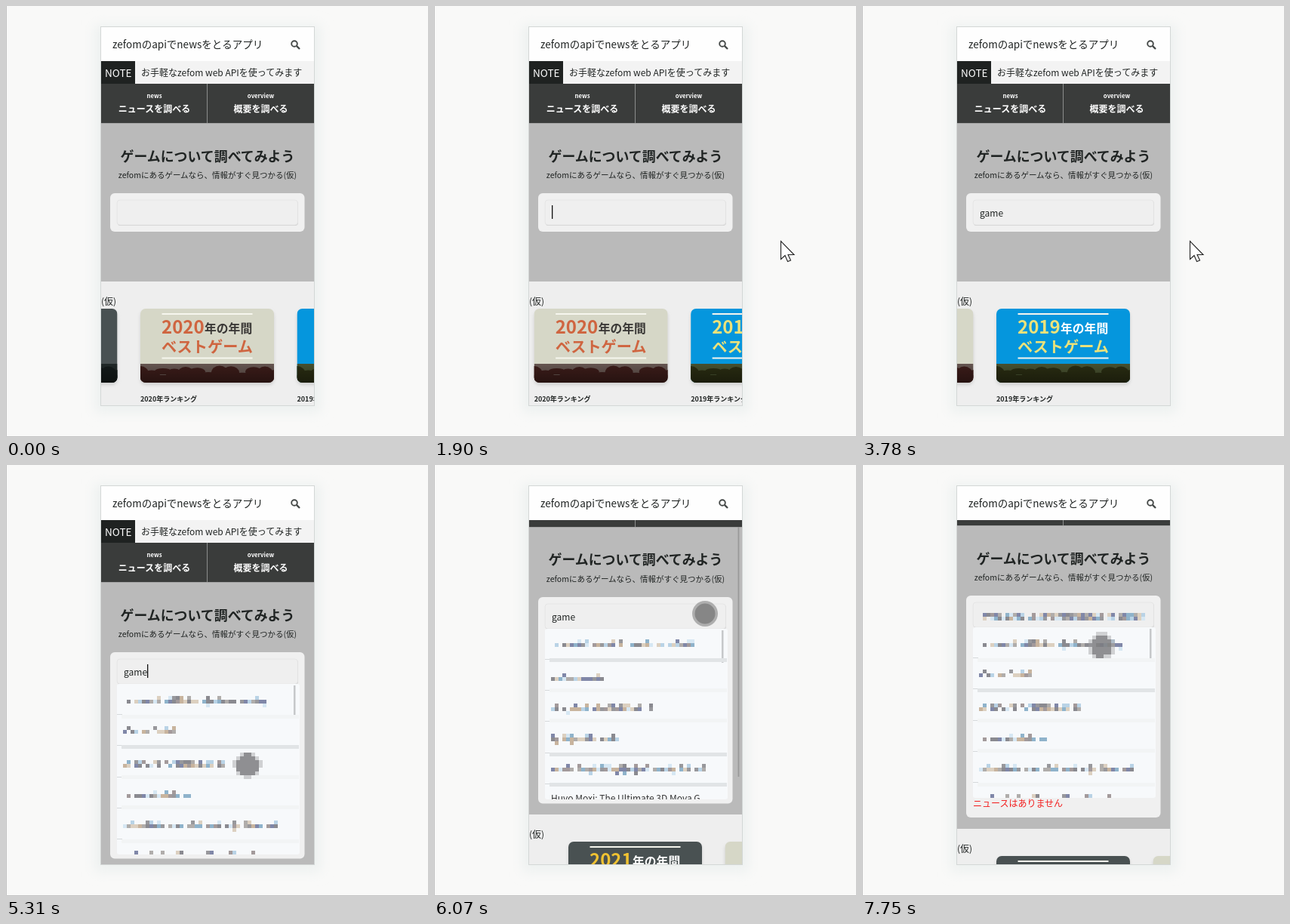
Animation, 559 px wide and 571 px high, one loop 8000 ms. Source, as an HTML page with a canvas:

```html
<!DOCTYPE html>
<html lang="ja">
<head>
<meta charset="utf-8">
<title>App demo</title>
<style>
  html, body { margin: 0; width: 100%; height: 100%; overflow: hidden; background: #f9f9f8; }
  svg, canvas { position: absolute; left: 0; top: 0; display: block; }
  text { font-family: "Noto Sans CJK JP", "Noto Sans CJK", "Noto Sans", sans-serif; fill: #202423; }
  .mid { text-anchor: middle; }
  .white { fill: #fff; }
  .bold { font-weight: 700; }
  .medium { font-weight: 500; }
</style>
</head>
<body>
<svg width="559" height="571" viewBox="0 0 559 571">
  <defs>
    <clipPath id="view"><rect x="126" y="28" width="282" height="501"/></clipPath>
    <clipPath id="round"><rect width="177" height="98" rx="7"/></clipPath>
    <filter id="soft" x="-20%" y="-20%" width="140%" height="140%"><feGaussianBlur stdDeviation="8"/></filter>
    <filter id="low" x="-10%" y="-10%" width="120%" height="130%"><feGaussianBlur stdDeviation="2"/></filter>
    <linearGradient id="shade" x2="0" y2="1">
      <stop offset="0" stop-color="#000" stop-opacity="0"/>
      <stop offset="1" stop-color="#000" stop-opacity=".35"/>
    </linearGradient>
  </defs>
  <path d="M.5 0V570.5H559" fill="none" stroke="#c2c2c2"/>
  <rect x="117" y="25" width="300" height="514" fill="#edf1f0" filter="url(#soft)"/>
  <rect x="125.5" y="27.5" width="283" height="502" fill="#eee" stroke="#d3d7d6"/>

  <g clip-path="url(#view)">
    <g id="page">
      <rect x="126" y="73" width="282" height="30" fill="#f3f3f3"/>
      <rect x="126" y="73" width="45" height="30" fill="#1f2221"/>
      <text class="white medium" x="131" y="94" font-size="13.5">NOTE</text>
      <text x="179" y="93" font-size="12">お手軽なzefom web APIを使ってみます</text>
      <rect x="126" y="103" width="282" height="52.5" fill="#3a3c3b"/>
      <path d="M266.5 103V155" stroke="#8b8d8c"/>
      <g class="mid bold">
        <text class="white" x="196.5" y="122" font-size="7.8">news</text>
        <text class="white" x="337.5" y="122" font-size="7.8">overview</text>
        <text class="white" x="196.5" y="141" font-size="12">ニュースを調べる</text>
        <text class="white" x="337.5" y="141" font-size="12">概要を調べる</text>
      </g>
      <rect id="hero" x="126" y="155.5" width="282" height="209.5" fill="#bababa"/>
      <text class="mid bold" x="267" y="205.500" font-size="17.900">ゲームについて調べてみよう</text>
      <text class="mid" x="267" y="228" font-size="10.5">zefomにあるゲームなら、情報がすぐ見つかる(仮)</text>
      <rect id="panel" x="138" y="248" width="257.500" rx="6" fill="#f0f0f0"/>
      <rect x="147.500" y="258" width="239.500" height="33" rx="4" fill="#d2d2d2"/>
      <rect x="147" y="257" width="239.500" height="33" rx="4" fill="#efefef" stroke="#e3e3e3" stroke-width=".8"/>
      <text id="typed" x="156" y="279" font-size="12"></text>
      <rect id="caret" x="156" y="264" width="1.3" height="18" fill="#111"/>
      <g id="list">
        <rect x="147" y="290" width="242" height="226" rx="3" fill="#f7f9fb"/>
        <rect x="381" y="292" width="2.500" height="43" fill="#c6c8ca"/>
      </g>
      <text id="error" x="147" y="528" font-size="12" style="fill:#f32020">ニュースはありません</text>
      <g id="below">
        <text x="126" y="396" font-size="12">(仮)</text>
        <g id="slider"></g>
      </g>
    </g>
    <rect x="126" y="28" width="282" height="45" fill="#fefefe"/>
    <text class="medium" x="141" y="56" font-size="13.5">zefomのapiでnewsをとるアプリ</text>
    <g fill="none" stroke="#434746" stroke-width="1.900">
      <circle cx="382" cy="50" r="3.800"/>
      <path d="M384.900 52.900L389 57" stroke-width="2.300"/>
    </g>
    <rect id="bar" x="402.500" width="1.800" height="331" fill="#999"/>
  </g>
</svg>
<canvas id="top" width="559" height="571"></canvas>

<script>
const DURATION = 8000, PITCH = 207.5, CELL = 5;
const $ = id => document.getElementById(id);
const ctx = $('top').getContext('2d');

function card(i, year, bg, main, sub, photo, trees) {
  const bumps = Array.from({ length: 13 }, (_, k) =>
    `<ellipse cx="${k * 15}" cy="${86 + 3 * Math.sin(k * 2.3)}" rx="11" ry="${7 + 3 * Math.cos(k * 1.7)}"/>`).join('');
  return `<g transform="translate(${178 + i * PITCH} 401)">
    <rect y="3" width="177" height="98" rx="7" fill="#cfcfcf" filter="url(#low)"/>
    <g clip-path="url(#round)">
      <rect width="177" height="98" fill="${bg}"/>
      <rect y="73" width="177" height="25" fill="${trees}"/>
      <g fill="${photo}">${bumps}<rect y="88" width="177" height="10"/></g>
      <rect y="73" width="177" height="25" fill="url(#shade)"/>
    </g>
    <path d="M28.500 7H148.500M28.500 65.500H148.500" stroke="#f6f6ee" stroke-width="2"/>
    <g class="bold">
      <text x="28" y="33" font-size="24" style="fill:${main}">${year}</text>
      <text x="85" y="32" font-size="15.800" style="fill:${sub}">年の年間</text>
      <text x="28" y="58" font-size="20.200" style="fill:${main}">ベストゲーム</text>
      <text x="0" y="123" font-size="9">${year}年ランキング</text>
    </g></g>`;
}
$('slider').innerHTML =
  card(-1, 2021, '#495152', '#f0c232', '#fff', '#131a19', '#202827') +
  card(0, 2020, '#d6d7c7', '#cf6540', '#3a3836', '#3b1c19', '#655550') +
  card(1, 2019, '#0596dd', '#ece27a', '#fff', '#292c12', '#46502f');

const pointerKeys = [
  [330, 529, 575], [1010, 309, 261], [1080, 306, 265], [1220, 301, 272], [1490, 301, 272],
  [1900, 459, 311], [2240, 434, 311], [5030, 434, 311], [5031, 303, 403], [5100, 320, 397],
  [5360, 320, 397], [5560, 359, 272], [6070, 359, 197], [6340, 359, 197], [6400, 367, 212],
  [6550, 367, 212], [7030, 317, 240]];
const scrollKeys = [[5560, 0], [6070, 73], [6140, 75]];
const slideKeys = [[1756, 0], [2236, -1], [4834, -1], [5134, 1]];
const caretOn = [[1490, 2570], [2790, 3780], [4320, 5400], [6350, 6900]];
const typing = [2790, 2920, 3050, 3310];

// Eased value between [time, ...values] keys
function at(keys, t) {
  const n = keys.findIndex(k => k[0] > t);
  if (n === 0) return keys[0].slice(1);
  if (n < 0) return keys[keys.length - 1].slice(1);
  const [a, b] = [keys[n - 1], keys[n]];
  const p = (t - a[0]) / (b[0] - a[0]), e = p * p * (3 - 2 * p);
  return a.slice(1).map((v, i) => v + (b[i + 1] - v) * e);
}
const show = (id, on) => $(id).setAttribute('visibility', on ? 'visible' : 'hidden');
const move = (id, x, y) => $(id).setAttribute('transform', `translate(${x} ${y})`);
function hash(a, b, c) {
  const v = Math.sin(a * 12.9898 + b * 78.233 + c * 37.719 + 4.1) * 43758.5453;
  return v - Math.floor(v);
}

const tints = ['#98989c', '#8a8a90', '#b0adab', '#c8b49e', '#b9d3e6', '#d6e7f3', '#8087a8', '#dcd0c0', '#8fb3cb', '#a39a9b'];
const rowEnds = [345, 225, 290, 245, 360, 335];

// Blocky stand-in for a text line: dense at letter height, sparse above and below
function blurLine(row, left, right, center) {
  for (let y = Math.floor((center - 10) / CELL) * CELL + 1; y < center + 8; y += CELL) {
    const d = y + 2 - center;
    const density = d < -7 || d > 6 ? 0 : d < -3 ? .3 : d < 2.9 ? .9 : .05;
    for (let x = left; x < right; x += CELL) {
      if (hash(x, row, 0) < .1 || hash(x, row, Math.round(d)) > density) continue;
      ctx.fillStyle = tints[Math.floor(hash(row, x, Math.round(d) + 9) * tints.length)];
      ctx.fillRect(x, y, CELL, CELL);
    }
  }
}

function drawList(scroll) {
  const top = 290 - scroll, bottom = Math.min(516 - scroll, 529);
  ctx.save();
  ctx.beginPath();
  ctx.rect(147, top, 242, bottom - top);
  ctx.clip();
  for (let i = 0; i < 5; i++) {
    const y = Math.round(331 + 41.25 * i - scroll), hit = y % CELL === 2 || y % CELL === 3;
    ctx.fillStyle = '#d6d9db';
    ctx.fillRect(147, y - 1, 7, 1);
    ctx.fillStyle = hit ? '#e1e4e6' : '#f2f4f5';
    ctx.fillRect(153, Math.floor((y - 1) / CELL) * CELL + 1, 235, CELL);
  }
  rowEnds.forEach((end, i) => {
    const center = 313 + 41.25 * i - scroll;
    if (i === 5 && scroll > 1 && scroll < 74) {
      ctx.font = '12px "Noto Sans CJK JP", "Noto Sans", sans-serif';
      ctx.fillStyle = '#333';
      ctx.fillText('Huvo Moxi: The Ultimate 3D Mova G', 155, center);
    } else blurLine(i, 155, end, center);
  });
  ctx.restore();
}

function disc(x, y, r, fill) {
  ctx.fillStyle = fill;
  ctx.beginPath();
  ctx.arc(x, y, r, 0, 2 * Math.PI);
  ctx.fill();
}

function blockDisc(cx, cy) {
  for (let x = Math.floor(cx / CELL) * CELL - 20; x <= cx + 20; x += CELL)
    for (let y = Math.floor(cy / CELL) * CELL - 19; y <= cy + 20; y += CELL) {
      const d = Math.hypot(x + 2.5 - cx, y + 2.5 - cy);
      if (d > 18) continue;
      ctx.fillStyle = d < 14.5 ? 'rgba(125,125,127,.85)' : 'rgba(160,160,163,.45)';
      ctx.fillRect(x, y, CELL, CELL);
    }
}

function drawPointer(x, y, blocky) {
  if (x >= 408) {
    const shape = [[0, 0], [0, 24], [5.5, 19], [9, 27], [13, 25.5], [9.5, 18], [17.5, 18]];
    ctx.beginPath();
    shape.forEach(([dx, dy]) => ctx.lineTo(x + dx + .5, y + dy + .5));
    ctx.closePath();
    ctx.fillStyle = '#fff';
    ctx.strokeStyle = '#222';
    ctx.lineWidth = 1.1;
    ctx.fill();
    ctx.stroke();
  } else if (blocky) blockDisc(x, y);
  else {
    disc(x, y, 17, 'rgba(110,110,110,.5)');
    disc(x, y, 13.5, '#868686');
  }
}

function render(t) {
  const [scroll] = at(scrollKeys, t), [slide] = at(slideKeys, t), [px, py] = at(pointerKeys, t);
  const open = t >= 4640, chosen = t >= 7290, failed = t >= 7750;
  const push = failed ? 192 : open ? 171 : 0;
  const count = typing.filter(k => t >= k).length;

  move('page', 0, -scroll);
  move('below', 0, push);
  move('slider', slide * PITCH, 0);
  $('hero').setAttribute('height', 209.5 + push);
  $('panel').setAttribute('height', failed ? 294 : open ? 273.5 : 51);
  $('typed').textContent = chosen ? '' : 'game'.slice(0, count);
  $('caret').setAttribute('x', 156 + [0, 7, 13.5, 24.5, 31][count]);
  show('caret', caretOn.some(([a, b]) => t >= a && t < b));
  show('list', open);
  show('error', failed);
  show('bar', t >= 5560 && t < 6380);
  $('bar').setAttribute('y', 34 + scroll * 48 / 73);

  ctx.clearRect(0, 0, 559, 571);
  if (open) drawList(scroll);
  if (chosen) blurLine(8, 160, 375, 201);
  if (t >= 330) drawPointer(px, py, open && py > 295 - scroll);
}

function loop() {
  render(performance.now() % DURATION);
  requestAnimationFrame(loop);
}
loop();
</script>
</body>
</html>
```
